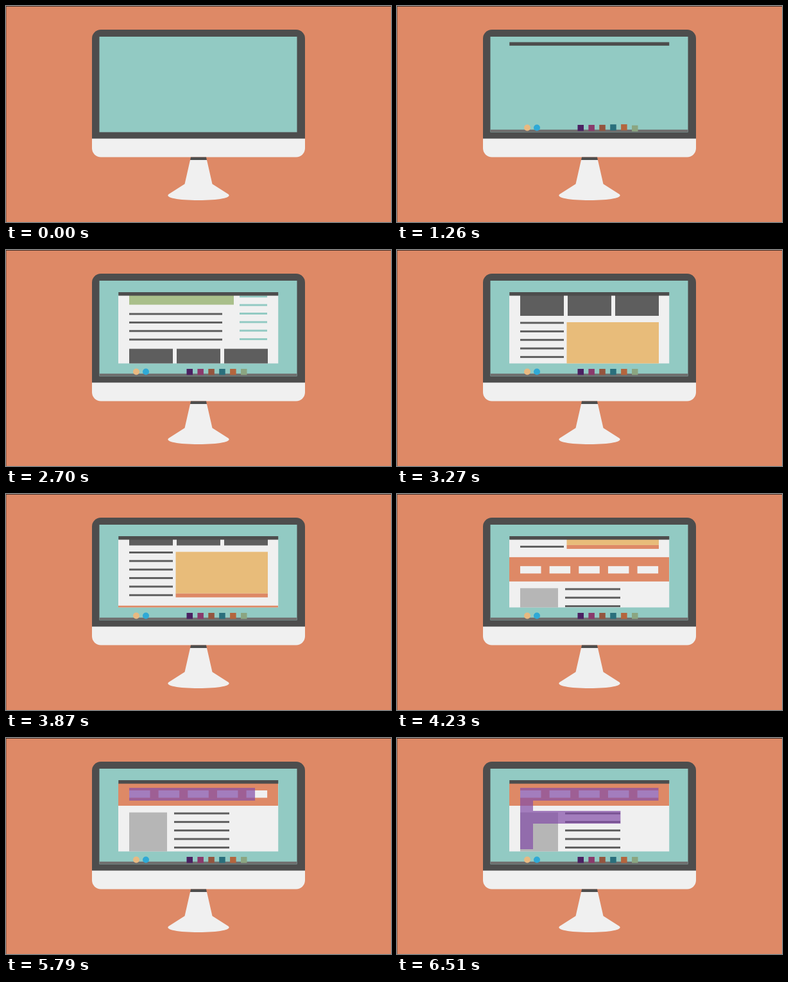
An HTML page with a canvas for the animation above (8 s loop, 600 by 338 pixels).

```html
<!DOCTYPE html>
<html lang="en">
<head>
<meta charset="utf-8">
<title>Web layout on a desktop monitor</title>
<style>
html, body { margin: 0; width: 100%; height: 100%; overflow: hidden; background: #de8966; }
canvas { display: block; }
</style>
</head>
<body>
<canvas id="stage" width="600" height="338"></canvas>
<script>
const LOOP = 8000;
const ctx = document.getElementById('stage').getContext('2d');

const ORANGE = '#de8966', TEAL = '#92cac3', DARK = '#4d4d4d', WHITE = '#f0f0f0';
const SLATE = '#5e5e5e', GRAY = '#b6b6b6', GREEN = '#a9bf8a', YELLOW = '#e8bc7a';
const PURPLE = 'rgba(131, 77, 168, .7)';
const PITCH = 13.35;

// time, scroll offset, speed in px per ms
const SCROLL = [
  [2230, 0, 0], [2700, 158, .42], [3270, 258, .012],
  [3840, 277, .09], [4230, 356.2, .13], [4930, 387.2, 0]
];

const SQUARES = ['#4b2162', '#8a3a6c', '#94553f', '#2a6f7c', '#b4653e', '#8ba581'];

const progress = (t, from, to) => Math.min(1, Math.max(0, (t - from) / (to - from)));
const easeInOut = x => x < .5 ? 2 * x * x : 1 - 2 * (1 - x) ** 2;
const easeOut = x => 1 - (1 - x) ** 3;
const backOut = x => 1 + 2.45 * (x - 1) ** 3 + 1.45 * (x - 1) ** 2;

function rect(x, y, w, h, color) {
  ctx.fillStyle = color;
  ctx.fillRect(x, y, w, h);
}

function disc(x, y, r, color) {
  ctx.fillStyle = color;
  ctx.beginPath();
  ctx.arc(x, y, r, 0, 2 * Math.PI);
  ctx.fill();
}

function textLines(x, y, w, count, color = SLATE) {
  for (let i = 0; i < count; i++) rect(x, y + i * PITCH - 1.5, w, 3, color);
}

function clipTo(x, y, w, h) {
  ctx.beginPath();
  ctx.rect(x, y, w, h);
  ctx.clip();
}

// Cubic Hermite between the scroll keys
function scrollAt(t) {
  const i = SCROLL.findIndex(key => key[0] > t);
  if (i === 0) return 0;
  if (i < 0) return SCROLL[SCROLL.length - 1][1];
  const [t0, y0, v0] = SCROLL[i - 1], [t1, y1, v1] = SCROLL[i];
  const d = t1 - t0, u = (t - t0) / d;
  return y0 + (y1 - y0) * u * u * (3 - 2 * u)
    + d * v0 * u * (1 - u) ** 2 - d * v1 * u * u * (1 - u);
}

function drawMonitor() {
  rect(0, 0, 600, 338, ORANGE);
  rect(0, 0, 600, 1, 'rgba(30, 25, 25, .8)');
  rect(0, 0, 1, 338, 'rgba(30, 25, 25, .35)');

  ctx.save();
  ctx.beginPath();
  ctx.roundRect(134, 37, 332, 199.5, 14);
  ctx.clip();
  rect(134, 37, 332, 171, DARK);
  rect(134, 207.5, 332, 30, WHITE);
  ctx.restore();
  rect(145.5, 48, 308, 149.5, TEAL);

  ctx.fillStyle = DARK;
  ctx.fill(new Path2D('M288 236.5H312L313 241.5H287Z'));
  ctx.fillStyle = WHITE;
  ctx.fill(new Path2D('M287 241H313L321.5 278.5L346.5 294.5C353 300 331 304 300 304S247 300 253.5 294.5L278.5 278.5Z'));
}

function drawPage() {
  rect(192, 71, 215, 61, SLATE);
  rect(192, 143, 59, 50, GRAY);
  textLines(262, 148, 145, 4);

  rect(192, 204, 163, 40, GREEN);
  textLines(364, 204.5, 43, 8, TEAL);
  textLines(192, 258.5, 145, 4);

  for (let i = 0; i < 3; i++) rect(192 + i * 74, 313, 68, 48, SLATE);
  textLines(192, 372, 68, 6);
  rect(264.5, 371, 143.5, 65.2, YELLOW);
  rect(264.5, 436.2, 143.5, 6, ORANGE);

  rect(175, 455.2, 249, 38, ORANGE);
  for (let i = 0; i < 5; i++) rect(192 + i * 45.65, 469.2, 32.5, 11.5, WHITE);
  rect(192, 503.7, 59, 70, GRAY);
  textLines(262, 505.2, 86, 6);
}

function drawReadingPath(t) {
  const grow = (from, to) => easeInOut(progress(t, from, to));
  const top = grow(5535, 5860), stem = grow(5840, 6130), arm = grow(6120, 6520);
  rect(192, 78, 215.5 * top, 20, PURPLE);
  rect(192, 98, 20, 76 * stem, PURPLE);
  rect(212, 114, 136.5 * arm, 20, PURPLE);
}

function drawWindow(t) {
  if (t < 1000) return;
  const rise = backOut(progress(t, 1000, 1470));
  const y = 198 - 132 * rise;
  const w = 249 * Math.min(1, Math.max(0, rise));
  const open = 106.5 * easeInOut(progress(t, 1430, 1750));
  if (open > 0) {
    ctx.save();
    clipTo(175, 71, 249.5, open);
    rect(175, 71, 249.5, 107, WHITE);
    ctx.translate(0, -scrollAt(t));
    drawPage();
    ctx.restore();
    drawReadingPath(t);
  }
  rect(299.75 - w / 2, y, w, 5.5, DARK);
}

function drawDock(t) {
  rect(145.5, 197.5 - 4 * easeOut(progress(t, 710, 900)), 308, 4, '#6f6c6c');
  const lift = i => 13 * (1 - backOut(progress(t, 820 + i * 50, 1080 + i * 50)));
  disc(203, 190.5 + lift(0), 5, '#e8b981');
  disc(218, 190.5 + lift(1), 5, '#2fa9d6');
  SQUARES.forEach((color, i) => rect(281.5 + i * 16.9, 186 + lift(i + 2), 9.5, 9.5, color));
}

function draw(t) {
  drawMonitor();
  ctx.save();
  clipTo(145.5, 48, 308, 149.5);
  drawWindow(t);
  drawDock(t);
  ctx.restore();
}

const start = performance.now();
function frame() {
  draw((performance.now() - start) % LOOP);
  requestAnimationFrame(frame);
}
frame();
</script>
</body>
</html>
```
